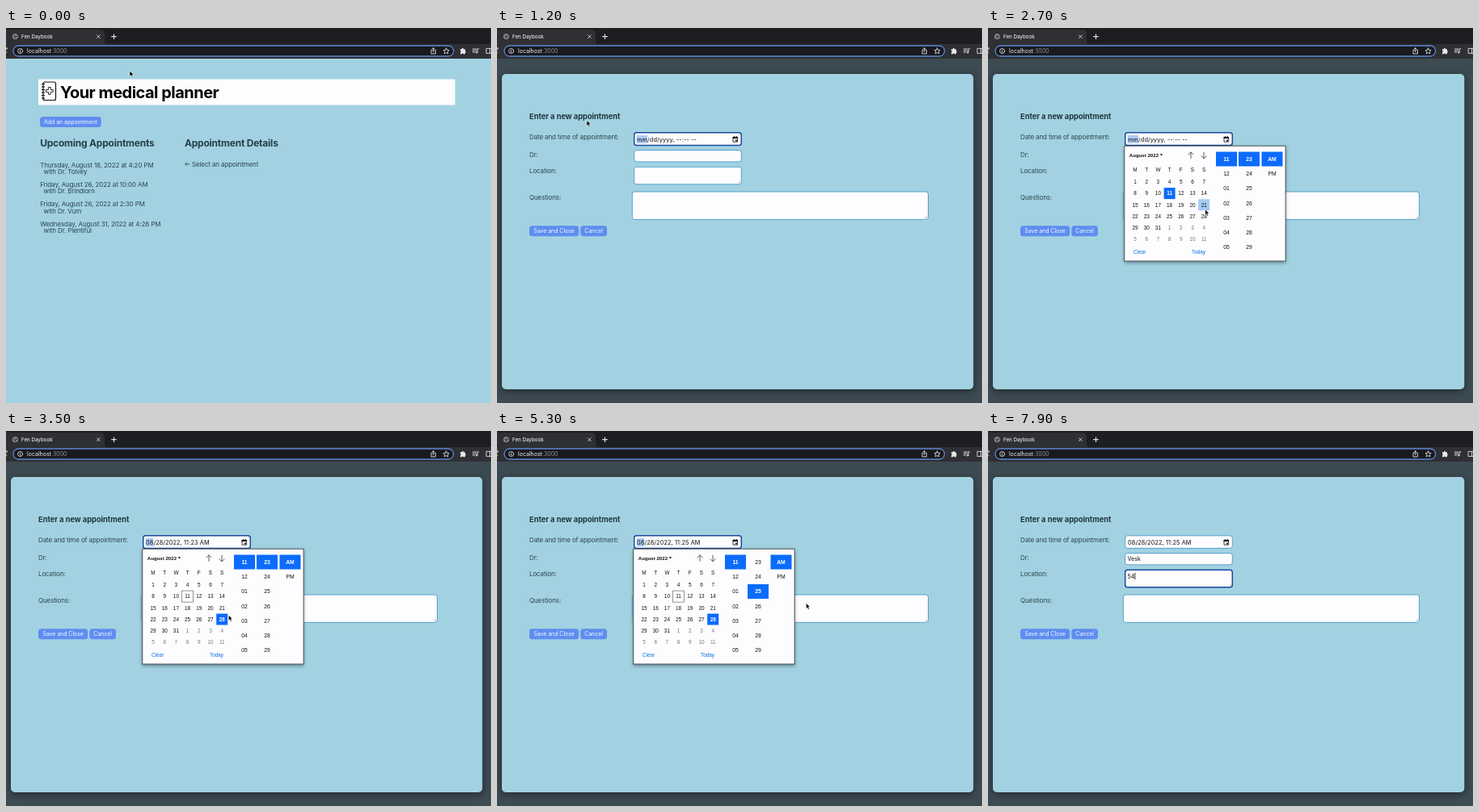
An HTML page for the animation above (8000 ms loop, 600 by 465 pixels).

```html
<!DOCTYPE html>
<html lang="en">
<head>
<meta charset="utf-8">
<title>Fen Daybook</title>
<style>
html, body { margin: 0; width: 100%; height: 100%; overflow: hidden; background: #a2d2e1; }
svg { display: block; width: 600px; height: 465px; }
text { font-family: Inter, sans-serif; white-space: pre; }
.body { font-size: 8px; letter-spacing: -.12px; fill: #2b444d; }
.h1 { font-size: 20px; font-weight: 700; letter-spacing: -.52px; fill: #050505; }
.h2 { font-size: 12px; font-weight: 700; letter-spacing: -.22px; fill: #273f48; }
.h3 { font-size: 9.36px; font-weight: 700; letter-spacing: -.05px; fill: #20363e; }
.btn rect { fill: #5f8df0; }
.btn text { font-size: 7px; letter-spacing: -.05px; fill: #f6f9ff; text-anchor: middle; }
.btn.over rect { fill: #234dbb; }
.field { fill: #fdfdff; stroke: #559fcb; stroke-width: 1; }
.field.focus { stroke: #1d4a9c; stroke-width: 1.5; }
.input { font-size: 7.3px; letter-spacing: .13px; fill: #111; }
.typed { font-size: 7.2px; fill: #111; }
.cell text, .pick { font-family: "Liberation Sans", Arial, sans-serif; font-size: 6.4px; fill: #111; }
.cell text { text-anchor: middle; }
.cell rect { fill: none; }
.cell.time text { font-size: 6.8px; }
.cell.dim text { fill: #777; }
.cell.today rect { stroke: #666; stroke-width: .7; }
.cell.over rect { fill: #a5cbf5; }
.cell.on rect { fill: #0b6bfb; stroke: none; }
.cell.on text { fill: #fff; font-weight: 700; }
.line { fill: none; stroke: #dfe1e5; stroke-width: .9; stroke-linecap: round; stroke-linejoin: round; }
.ink { fill: none; stroke: #111; stroke-width: 1.2; stroke-linejoin: round; }
</style>
</head>
<body>
<svg viewBox="0 0 600 465">
  <rect id="back" y="37" width="600" height="428"/>

  <g id="home">
    <rect x="40" y="63.5" width="515.5" height="32" fill="#fdfdff"/>
    <g class="ink">
      <rect x="46" y="67" width="15.5" height="22.5" rx="2"/>
      <path id="spiral" d=""/>
      <path d="M52.4 73.5h2.8v3h3v2.8h-3v3h-2.8v-3h-3v-2.8h3z" stroke-width=".9"/>
    </g>
    <text class="h1" x="67" y="86.8">Your medical planner</text>
    <g class="btn" id="add"><rect x="42" y="110" width="75.7" height="13" rx="3.5"/><text x="80" y="119.1">Add an appointment</text></g>
    <text class="h2" x="42.2" y="147">Upcoming Appointments</text>
    <text class="h2" x="221" y="147">Appointment Details</text>
    <path d="M227.3 168.8h-5.6m2.3-2.4l-2.4 2.4l2.4 2.4" fill="none" stroke="#2b444d" stroke-width=".8"/>
    <text class="body" x="230" y="171.7">Select an appointment</text>
    <g id="visits"></g>
  </g>

  <g id="modal">
    <rect x="6" y="57" width="583.3" height="391" rx="5" fill="#a2d2e1" style="filter:drop-shadow(0 2px 4px rgba(0,0,0,.45))"/>
    <text class="h3" x="40" y="112.9">Enter a new appointment</text>
    <text class="body" x="40" y="137.6">Date and time of appointment:</text>
    <text class="body" x="40" y="159.6">Dr:</text>
    <text class="body" x="40" y="180.2">Location:</text>
    <text class="body" x="40" y="213.2">Questions:</text>
    <rect class="field" id="date" x="169.7" y="129.8" width="132.6" height="15.6" rx="3"/>
    <rect class="field" id="doctor" x="169.7" y="151.6" width="132.6" height="14.3" rx="3"/>
    <rect class="field" id="place" x="169.7" y="172.3" width="132.6" height="21.5" rx="3"/>
    <rect class="field" x="167.3" y="203" width="366.2" height="34.4" rx="3"/>
    <path d="M298 192.3l3-3m-1.2 3l1.2-1.2M529 236l3-3m-1.2 3l1.2-1.2" stroke="#888" stroke-width=".5"/>
    <rect id="mark" x="172.8" y="133" height="10" fill="#a9cbf6"/>
    <text class="input" id="when" x="173" y="140.6"></text>
    <path d="M292 135.5h5.6v5.7h-5.6z" fill="none" stroke="#111" stroke-width=".8"/>
    <path d="M291.6 135h6.4v2h-6.4zM293 134h1v1h-1zM295.7 134h1v1h-1zM295 138.6h1.8v1.8h-1.8z" fill="#111"/>
    <text class="typed" id="name" x="172.4" y="161.4"></text>
    <text class="typed" id="spot" x="172.4" y="182.6"></text>
    <rect id="caret" width=".8" height="8.4" fill="#111"/>
    <g class="btn"><rect x="40" y="245.3" width="61.2" height="13" rx="3.5"/><text x="70.6" y="254.4">Save and Close</text></g>
    <g class="btn"><rect x="103.3" y="245.3" width="32.7" height="13" rx="3.5"/><text x="119.7" y="254.4">Cancel</text></g>
  </g>

  <g id="picker">
    <rect x="168.8" y="146.2" width="199.3" height="142.8" fill="#fdfdff" stroke="#3c4447" stroke-width=".9" style="filter:drop-shadow(0 2px 2px rgba(0,0,0,.35))"/>
    <text class="pick" x="174.8" y="159.6" font-weight="700" style="font-size:6.1px">August 2022</text>
    <path d="M212.8 156.2h3.4l-1.7 2.2z" fill="#111"/>
    <path d="M251 161.8v-8m-3.3 3.3l3.3-3.3l3.3 3.3M267 153.8v8m-3.3-3.3l3.3 3.3l3.3-3.3" fill="none" stroke="#333" stroke-width=".8"/>
    <g id="cells"></g>
    <text class="pick" x="180" y="279.6" style="fill:#0b6fe0">Clear</text>
    <text class="pick" x="252" y="279.6" style="fill:#0b6fe0">Today</text>
  </g>

  <g id="chrome">
    <rect width="600" height="38" fill="#1d1e22"/>
    <path d="M0 20V2h117q5 0 5 5v9q0 4 4 4h474v18H0z" fill="#2f3034"/>
    <path d="M126 20h474V0H0v2h117q5 0 5 5v9q0 4 4 4z" fill="#1d1e22"/>
    <circle cx="11.4" cy="10.6" r="3" fill="none" stroke="#b6b9be" stroke-width=".9"/>
    <path d="M9 9.4q2 .2 2.4 1.4t2.5 1M11.4 7.8q-.3 1.5 1.6 1.3M10 13q.2-1.4-1.2-1.8" fill="none" stroke="#b6b9be" stroke-width=".8"/>
    <text x="19" y="12.8" font-size="6.2" font-weight="500" fill="#e4e6ea">Fen Daybook</text>
    <g class="line">
      <path d="M112.6 8.8l3.6 3.6m0-3.6l-3.6 3.6"/>
      <path d="M133.5 7.7v5.8m-2.9-2.9h5.8" stroke-width="1.1"/>
      <path d="M0 26h1m0-1.6V26M0 31l.8-1"/>
    </g>
    <rect x="9" y="22" width="544.6" height="13" rx="6.5" fill="#191a1e" stroke="#5b86cf" stroke-width="1.3"/>
    <g class="line" stroke-width=".8">
      <circle cx="17.6" cy="28.5" r="3"/><path d="M17.6 28.4v1.6m0-3v.1"/>
      <path d="M527.2 27.3h-1.2v4.6h5.4v-4.6h-1.2M528.7 29.6v-4.8m-1.4 1.4l1.4-1.4l1.4 1.4"/>
      <path d="M544.6 25l1.1 2.3 2.5.3-1.8 1.7.5 2.5-2.3-1.2-2.3 1.2.5-2.5-1.8-1.7 2.5-.3z"/>
      <path d="M577.4 26h4.6m-4.6 2h4.6m-4.6 2h2.6M583.2 30v-4.2h1.7"/>
      <path d="M594.5 25.4h7v6h-7zM598.6 25.4v6"/>
    </g>
    <path d="M562 26.3h1.8a1.2 1.2 0 0 1 2.4 0h1.8v1.9a1.2 1.2 0 0 1 0 2.3v1.7h-2a1.1 1.1 0 0 0-2.1 0H562v-2a1.1 1.1 0 0 0 0-2.1z" fill="#e6e8eb"/>
    <circle cx="582.3" cy="30.3" r="1.1" fill="#e6e8eb"/>
    <text x="26" y="31" font-size="7" fill="#f1f3f4">localhost<tspan fill="#8d9196">:3000</tspan></text>
  </g>

  <g id="pointer">
    <g id="ring" fill="none"><circle r="14.6" stroke="#fff" stroke-width="3.2" opacity=".75"/><circle r="14.5" stroke="#111" stroke-width="1.7"/></g>
    <path id="arrow" d="M0 0v7l1.6-1.4 1.1 2.5 1.3-.6-1.1-2.4h2.2z" fill="#000" stroke="#fff" stroke-width=".6"/>
    <path id="hand" d="M-.4.2q.9-.7 1.4.4l.6 2.2 2.6.6q1 .4.8 1.6l-.5 3.4H.8L-1.6 5.5q-.2-1 .9-.7l.6.4z" fill="#fff" stroke="#000" stroke-width=".7"/>
    <path id="beam" d="M-1.5-4q1.5 0 1.5 1q0-1 1.5-1M0-3v6.4M-1.5 4.2q1.5 0 1.5-1q0 1 1.5 1" fill="none" stroke="#111" stroke-width=".8"/>
  </g>
</svg>
<script>
const LOOP = 8000, STEP = 100;
const OPEN = 1200, PICK = 2300, DAY = 3100, MINUTE = 4500, CLOSE = 5700,
      DOCTOR = 6500, PLACE = 7300;
const CLICKS = [1000, 2200, 3000, 4400, 5600, 6400];
const DOCTOR_KEYS = [6700, 6800, 7000, 7100], PLACE_KEYS = [7800, 7900];
// time, x, y
const PATH = [
  [0, 153, 53], [300, 153, 53], [900, 111, 114.5], [1300, 111, 114.5],
  [2000, 294.8, 137], [2300, 294.8, 137], [2700, 268.6, 225], [2900, 267, 233],
  [3300, 267, 233], [4100, 320, 202], [4700, 320, 202], [5400, 386, 214],
  [5700, 386, 214], [6200, 233, 166], [6400, 233, 160], [LOOP, 233, 160]
];

const $ = id => document.getElementById(id);
const show = (id, on) => { $(id).style.display = on ? "" : "none"; };
const pad = n => String(n).padStart(2, "0");

function add(parent, tag, attrs, content = "") {
  const el = document.createElementNS("http://www.w3.org/2000/svg", tag);
  for (const key in attrs) el.setAttribute(key, attrs[key]);
  el.textContent = content;
  return parent.appendChild(el);
}

[["Thursday, August 18, 2022 at 4:20 PM", "Tolvey"],
 ["Friday, August 26, 2022 at 10:00 AM", "Brindlorn"],
 ["Friday, August 26, 2022 at 2:30 PM", "Vum"],
 ["Wednesday, August 31, 2022 at 4:26 PM", "Plentiful"]].forEach(([when, who], i) => {
  const y = 172.6 + i * 24.4;
  add($("visits"), "text", { class: "body", x: 42.2, y }, when);
  add($("visits"), "text", { class: "body", x: 46.5, y: y + 8.2 }, "with Dr. " + who);
});

$("spiral").setAttribute("d", Array.from({ length: 6 }, (_, i) => `M44 ${69.5 + i * 3.5}h4`).join(""));

const cells = [];
function cell(x, y, w, h, label, kind) {
  const g = add($("cells"), "g", {});
  add(g, "rect", { x: x - w / 2, y: y - h / 2, width: w, height: h });
  add(g, "text", { x, y: y + 2.3 }, label);
  cells.push({ g, x, y, w, h, kind, label });
}
[..."MTWTFSS"].forEach((d, i) => cell(182 + i * 14.2, 176, 14, 13, d, "head"));
for (let i = 0; i < 42; i++) {
  cell(182 + i % 7 * 14.2, 190.9 + Math.floor(i / 7) * 14.2, 14, 14,
       String(i % 31 + 1), i < 31 ? "day" : "day dim");
}
for (let i = 0; i < 7; i++) {
  const y = 162.5 + i * 18.25;
  cell(295, y, 26, 18, pad((i + 10) % 12 + 1), "time hour");
  cell(323, y, 26, 18, String(23 + i), "time minute");
  if (i < 2) cell(351.5, y, 26, 18, ["AM", "PM"][i], "time half");
}

function pointerAt(t) {
  const i = PATH.findIndex(p => p[0] > t) - 1;
  const [t0, x0, y0] = PATH[i], [t1, x1, y1] = PATH[i + 1];
  const u = (t - t0) / (t1 - t0), e = u * u * (3 - 2 * u);
  return [x0 + (x1 - x0) * e, y0 + (y1 - y0) * e];
}

const inside = (x, y, l, t, r, b) => x > l && x < r && y > t && y < b;
const typed = (word, keys, t) => word.slice(0, keys.filter(k => k <= t).length);

function drawPicker(t, x, y) {
  const chosen = {
    day: t < DAY ? "11" : "28", "time hour": "11",
    "time minute": t < MINUTE ? "23" : "25", "time half": "AM"
  };
  for (const c of cells) {
    const names = ["cell", c.kind];
    if (c.kind === "day" && c.label === "11") names.push("today");
    if (c.kind !== "head" && Math.abs(x - c.x) < c.w / 2 && Math.abs(y - c.y) < c.h / 2) names.push("over");
    if (chosen[c.kind] === c.label) names.push("on");
    c.g.setAttribute("class", names.join(" "));
  }
}

function drawForm(t) {
  const focus = t < DOCTOR ? "date" : t < PLACE ? "doctor" : "place";
  for (const id of ["date", "doctor", "place"]) $(id).classList.toggle("focus", id === focus);
  $("when").textContent = t < DAY ? "mm/dd/yyyy, --:-- --"
    : `08/28/2022, 11:${t < MINUTE ? 23 : 25} AM`;
  $("mark").setAttribute("width", t < DAY ? 13.2 : 9.4);
  show("mark", focus === "date");
  $("name").textContent = typed("Vesk", DOCTOR_KEYS, t);
  $("spot").textContent = typed("54", PLACE_KEYS, t);
  show("caret", focus !== "date");
  const text = $(focus === "place" ? "spot" : "name");
  $("caret").setAttribute("x", 172.6 + (text.textContent ? text.getComputedTextLength() : 0));
  $("caret").setAttribute("y", focus === "place" ? 175.8 : 154.6);
}

function draw(t) {
  const [x, y] = pointerAt(t);
  const modal = t >= OPEN, picker = t >= PICK && t < CLOSE;
  show("home", !modal);
  show("modal", modal);
  show("picker", picker);
  $("back").setAttribute("fill", modal ? "#3c4a51" : "#a2d2e1");

  const onButton = !modal && inside(x, y, 42, 110, 118, 123);
  $("add").classList.toggle("over", onButton);
  $("add").setAttribute("transform", onButton ? "translate(80 116.5) scale(.95) translate(-80 -116.5)" : "");
  if (modal) drawForm(t);
  if (picker) drawPicker(t, x, y);

  const onField = modal && !picker && (inside(x, y, 169, 129, 290, 146)
    || inside(x, y, 169, 151, 303, 167) || inside(x, y, 169, 172, 303, 194)
    || inside(x, y, 167, 203, 534, 238));
  show("pointer", t < DOCTOR_KEYS[0]);
  show("hand", onButton);
  show("beam", onField);
  show("arrow", !onButton && !onField);
  show("ring", CLICKS.some(c => t >= c && t < c + 200));
  $("pointer").setAttribute("transform", `translate(${x} ${y})`);
}

const start = performance.now();
function tick(now) {
  const t = Math.max(0, now - start) % LOOP;
  draw(Math.floor(t / STEP) * STEP);
  requestAnimationFrame(tick);
}
draw(0);
requestAnimationFrame(tick);
</script>
</body>
</html>
```
